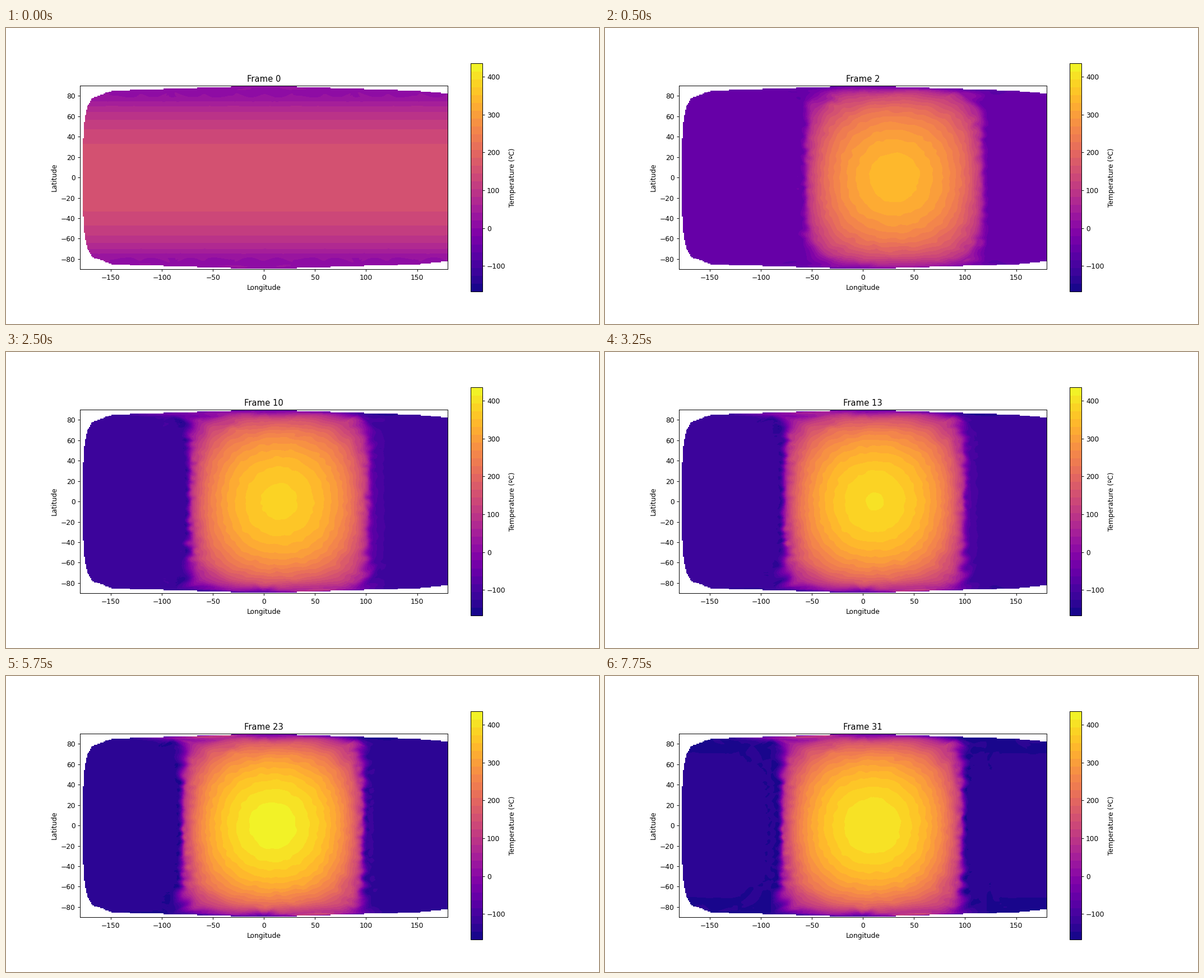
A matplotlib script that plays this animation: 1058 by 529 pixels, repeating every 8000 ms.

```python
import numpy as np
import matplotlib.pyplot as plt
from matplotlib.animation import FuncAnimation
from matplotlib.tri import Triangulation

FRAMES, INTERVAL = 32, 250
WIDTH = 1058
T_MIN, T_MAX = -167.0, 434.7
LEVELS = np.linspace(T_MIN, T_MAX, 30)
KELVIN = 273.15
COOLING, COOLING_POWER = 5.21e-8, 0.65
NEXT, PREV = [1, 2, 0], [2, 0, 1]


def unit(v):
    return v / np.linalg.norm(v, axis=-1, keepdims=True)


def icosphere(subdivisions):
    phi = (1 + 5 ** 0.5) / 2
    corners = np.array([np.roll((0, s, t * phi), k)
                        for k in range(3) for s in (1, -1) for t in (1, -1)])
    dist = np.linalg.norm(corners[:, None] - corners, axis=2)
    near = (dist > 1) & (dist < 2.1)
    faces = unit(np.array([corners[[a, b, c]] for a in range(12)
                           for b in range(a) for c in range(b)
                           if near[a, b] and near[b, c] and near[a, c]]))
    for _ in range(subdivisions):
        a, b, c = faces[:, 0], faces[:, 1], faces[:, 2]
        ab, bc, ca = unit(a + b), unit(b + c), unit(c + a)
        faces = np.concatenate([np.stack(f, axis=1) for f in (
            (a, ab, ca), (b, bc, ab), (c, ca, bc), (ab, bc, ca))])
    # adding zero turns -0.0 into 0.0, so the seam lies at +180 degrees
    return np.unique(np.round(faces.reshape(-1, 3), 12) + 0.0, axis=0)


def orbit(day):
    """Distance in units of the closest approach, and subsolar longitude."""
    ecc = 0.2056
    mean = 2 * np.pi * day / 87.97
    anomaly = mean
    for _ in range(30):
        anomaly = mean + ecc * np.sin(anomaly)
    true = 2 * np.arctan(np.sqrt((1 + ecc) / (1 - ecc)) * np.tan(anomaly / 2))
    distance = (1 - ecc * np.cos(anomaly)) / (1 - ecc)
    return distance, true - np.radians(6.1385 * day - 9.0)


def cooling_age(kelvin):
    """Days in the dark after which the ground has this temperature."""
    return (kelvin ** -3 / COOLING) ** (1 / COOLING_POWER)


def cooled_temperature(age):
    return (COOLING * age ** COOLING_POWER) ** (-1 / 3)


def simulate(points):
    """Node temperatures in degrees Celsius, one column per day."""
    rng = np.random.default_rng(4)
    normals = unit(points + rng.normal(0, 0.012, points.shape))
    cos_lat = np.hypot(points[:, 0], points[:, 1])
    kelvin = 436 * np.clip(cos_lat, 0.2, 1) ** 0.25
    days = [kelvin]
    for n in range(1, FRAMES):
        distance, lon = orbit(n - 24)
        height = normals @ [np.cos(lon), np.sin(lon), 0]
        heated = 701.5 / distance ** 0.47 * np.clip(height, 0, None) ** 0.25
        kelvin = np.maximum(heated,
                            cooled_temperature(cooling_age(kelvin) + 1))
        days.append(kelvin)
    return np.array(days).T - KELVIN


def estimate_gradients(mesh, z):
    """Gradients that minimise the curvature along the mesh edges."""
    edges = np.concatenate([mesh.edges, mesh.edges[:, ::-1]])
    i, j = edges[np.argsort(edges[:, 0], kind="stable")].T
    starts = np.searchsorted(i, np.arange(len(z)))
    ex = (mesh.x[j] - mesh.x[i])[:, None]
    ey = (mesh.y[j] - mesh.y[i])[:, None]
    w = np.hypot(ex, ey) ** -3

    def gather(values):
        return np.add.reduceat(values, starts, axis=0)

    qxx, qxy, qyy = (gather(4 * w * e) for e in (ex * ex, ex * ey, ey * ey))
    det = qxx * qyy - qxy ** 2
    base = 6 * w * (z[i] - z[j])
    gx, gy = np.zeros_like(z), np.zeros_like(z)
    for _ in range(30):
        s = base + 2 * w * (ex * gx[j] + ey * gy[j])
        sx, sy = gather(s * ex), gather(s * ey)
        gx = (qxy * sy - qyy * sx) / det
        gy = (qxy * sx - qxx * sy) / det
    return gx, gy


def barycentric(mesh, tri, x, y):
    px, py = mesh.x[mesh.triangles[tri]], mesh.y[mesh.triangles[tri]]
    dx, dy = px - x[:, None], py - y[:, None]
    area = dx[:, NEXT] * dy[:, PREV] - dx[:, PREV] * dy[:, NEXT]
    return area / area.sum(axis=1, keepdims=True)


def cross_edge_factors(mesh):
    neighbors = mesh.neighbors[:, NEXT]
    cx, cy = (p[mesh.triangles].mean(axis=1) for p in (mesh.x, mesh.y))
    every = np.arange(len(mesh.triangles))
    factors = np.full(neighbors.shape, -0.5)
    for k in range(3):
        other = neighbors[:, k]
        c = barycentric(mesh, every, cx[other], cy[other])
        a, b = c[:, PREV[k]], c[:, NEXT[k]]
        inner = other >= 0
        factors[inner, k] = ((2 * a + b - 1) / (2 - 3 * a - 3 * b))[inner]
    return factors


def interpolate(mesh, z, lon, lat):
    """Clough-Tocher interpolation of every column of z on a lon/lat grid."""
    x, y = np.meshgrid(np.minimum(lon, 180 - 1e-6), lat)
    tri = mesh.get_trifinder()(x, y)
    inside = tri >= 0
    tri = tri[inside]
    nodes = mesh.triangles[tri]
    b = barycentric(mesh, tri, x[inside], y[inside])
    b4 = 3 * b.min(axis=1, keepdims=True)
    b = b - b4 / 3
    bn, bp = b[:, NEXT], b[:, PREV]
    factor = cross_edge_factors(mesh)[tri]
    px, py = mesh.x[nodes], mesh.y[nodes]
    step_n = (px[:, NEXT] - px) / 3, (py[:, NEXT] - py) / 3
    step_p = (px[:, PREV] - px) / 3, (py[:, PREV] - py) / 3
    gx, gy = estimate_gradients(mesh, z)

    fields = []
    for k in range(z.shape[1]):
        f, dx, dy = z[nodes, k], gx[nodes, k], gy[nodes, k]
        n = f + dx * step_n[0] + dy * step_n[1]
        p = f + dx * step_p[0] + dy * step_p[1]
        u = (f + n + p) / 3
        fb, nb, ub = f[:, NEXT], n[:, NEXT], u[:, NEXT]
        fc, pc, uc = f[:, PREV], p[:, PREV], u[:, PREV]
        h = (factor * (fc - fb + 3 * (nb - pc))
             + (2 * nb - fb - pc + ub + uc) / 2)
        q = (h[:, NEXT] + h[:, PREV] + u) / 3
        value = (b ** 3 * f + 3 * b ** 2 * (bn * n + bp * p + b4 * u)
                 + 3 * b * b4 ** 2 * q + 6 * bn * bp * b4 * h).sum(axis=1)
        value += b4[:, 0] ** 3 * q.mean(axis=1)
        field = np.full(x.shape, np.nan)
        field[inside] = np.clip(value, T_MIN + 0.1, T_MAX - 0.1)
        fields.append(np.ma.masked_invalid(field))
    return fields


points = icosphere(4)
node_lon = np.degrees(np.arctan2(points[:, 1], points[:, 0]))
node_lat = np.degrees(np.arctan2(points[:, 2],
                                 np.hypot(points[:, 0], points[:, 1])))
grid_lon, grid_lat = np.linspace(-180, 180, 361), np.linspace(-90, 90, 181)
fields = interpolate(Triangulation(node_lon, node_lat), simulate(points),
                     grid_lon, grid_lat)

fig = plt.figure(figsize=(12, 6), dpi=WIDTH / 12)
ax = fig.add_subplot()
ax.set(xlim=(-180, 180), ylim=(-90, 90), aspect="equal",
       xlabel="Longitude", ylabel="Latitude")
title = ax.set_title("Frame 0")


def draw_field(n):
    return ax.contourf(grid_lon, grid_lat, fields[n], levels=LEVELS,
                       cmap="plasma", corner_mask=False)


shown = [draw_field(0)]
fig.colorbar(shown[0], ax=ax, ticks=range(-100, 401, 100),
             label="Temperature (ºC)")


def update(n):
    shown.pop().remove()
    shown.append(draw_field(n))
    title.set_text(f"Frame {n}")
    return shown[0], title


animation = FuncAnimation(fig, update, frames=FRAMES, interval=INTERVAL,
                          repeat=True, repeat_delay=0, blit=False)
plt.show()
```
